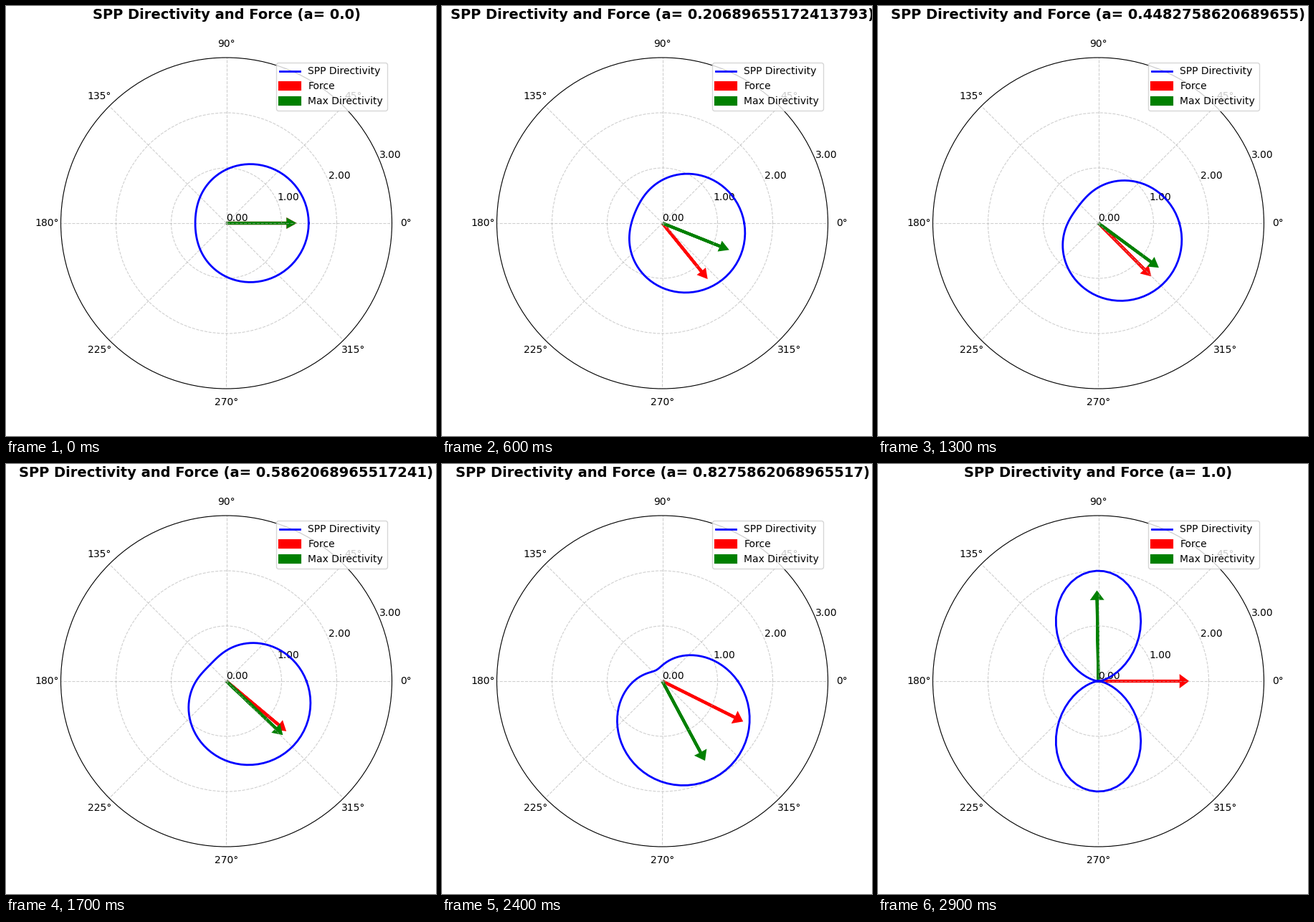
A matplotlib script that plays this animation: 600 px wide and 600 px high, repeating every 3000 ms.

```python
import numpy as np
import matplotlib.pyplot as plt
from matplotlib.animation import FuncAnimation

FRAMES = 30
INTERVAL = 100
mix = np.linspace(0, 1, FRAMES)
phi = np.linspace(0, 2 * np.pi, 100)


def directivity(a):
    """Interference of vertical and in-plane dipoles, normalised to mean 1."""
    p, s = np.sqrt(1 - a), np.sqrt(a)
    z, x, y = p, 0.2384 * p, -0.197 * s
    mean = z**2 + (x**2 + y**2) / 2
    return (z + x * np.cos(phi) + y * np.sin(phi))**2 / mean


def force_angle(a):
    return np.arctan2(-np.sqrt(a * (1 - a)), 0.185 + 0.69 * a)


def add_arrow(color, label):
    return ax.arrow(0, 0, 0, 1, head_width=0.1, head_length=0.1,
                    color=color, lw=3, label=label)


fig, ax = plt.subplots(figsize=(6, 6), dpi=100,
                       subplot_kw={"projection": "polar"})
curve, = ax.plot(phi, directivity(0), color="blue", lw=2,
                 label="SPP Directivity")
force = add_arrow("red", "Force")
peak = add_arrow("green", "Max Directivity")

ax.set_ylim(0, 3)
ax.set_yticks(range(4))
ax.yaxis.set_major_formatter("{x:.2f}")
ax.grid(True, linestyle="--", alpha=0.6)
ax.legend(loc="upper right")
title = ax.set_title("", fontsize=14, fontweight="bold", pad=20)


def update(i):
    a = mix[i]
    r = directivity(a)
    top = np.argmax(np.round(r, 9))  # rounding settles ties
    length = 0.75 * r[top]
    curve.set_ydata(r)
    force.set_data(x=force_angle(a), y=0, dx=0, dy=length)
    peak.set_data(x=phi[top], y=0, dx=0, dy=length)
    title.set_text(f"SPP Directivity and Force (a= {a})")
    return curve, force, peak, title


anim = FuncAnimation(fig, update, frames=FRAMES, interval=INTERVAL,
                     repeat=True, repeat_delay=0)
plt.show()
```
